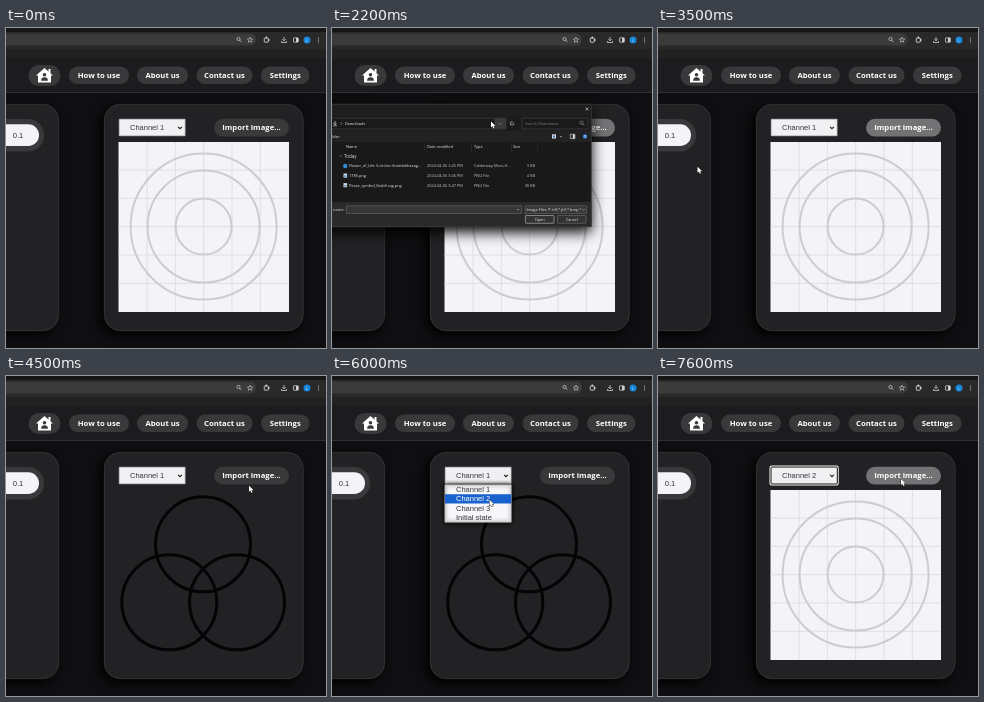
These frames come from a looping animation (320 px wide and 320 px high, 8000 ms). An HTML page with a canvas:

```html
<!DOCTYPE html>
<html lang="en">
<head>
<meta charset="utf-8">
<title>Import image</title>
<style>
html, body { margin: 0; width: 100%; height: 100%; overflow: hidden; background: #0f0e11; }
canvas { display: block; width: 320px; height: 320px; }
</style>
</head>
<body>
<canvas id="stage"></canvas>
<script>
const LOOP = 8000, STEP = 100;
const canvas = document.getElementById('stage');
const dpr = window.devicePixelRatio || 1;
canvas.width = canvas.height = Math.round(320 * dpr);
const c = canvas.getContext('2d');

const UI = '"Open Sans", "Noto Sans", sans-serif';
const ARIAL = '"Liberation Sans", Arial, sans-serif';
const PILL = '#39383a', PILL_HOVER = '#737274', PAPER = '#f4f3f7';

// Pointer stops: time, x, y
const PATH = [
  [400, 53, 190], [700, 130, 150], [1000, 222, 106], [1200, 234, 103.5],
  [1500, 231.5, 102.5], [1800, 231.5, 102.5], [2000, 208, 98], [2200, 159, 93.5],
  [2500, 58, 128], [2700, 37.5, 138], [2900, 37.5, 138], [3200, 39.5, 138.8],
  [3700, 39.5, 138.8], [4000, 110, 128], [4300, 220, 113], [4600, 254.5, 108.2],
  [4700, 247, 104], [4900, 214, 101], [5100, 176, 99], [5300, 169, 99],
  [5400, 169, 99], [5700, 162, 111], [6000, 157.5, 123.8], [6700, 157.5, 123.8],
  [7000, 183, 117], [7300, 231, 105], [7500, 243.5, 104], [7600, 243, 103]
];

function pointer(t) {
  if (t < PATH[0][0]) return null;
  for (let i = 1; i < PATH.length; i++) {
    const [t0, x0, y0] = PATH[i - 1], [t1, x1, y1] = PATH[i];
    if (t <= t1) {
      const k = (t - t0) / (t1 - t0);
      return { x: x0 + (x1 - x0) * k, y: y0 + (y1 - y0) * k };
    }
  }
  const last = PATH[PATH.length - 1];
  return { x: last[1], y: last[2] };
}

function rect(x, y, w, h, fill) {
  c.fillStyle = fill;
  c.fillRect(x, y, w, h);
}

function box(x, y, w, h, r, fill, stroke, lw = 0.6) {
  c.beginPath();
  c.roundRect(x, y, w, h, r);
  if (fill) { c.fillStyle = fill; c.fill(); }
  if (stroke) { c.strokeStyle = stroke; c.lineWidth = lw; c.stroke(); }
}

function line(color, lw, ...p) {
  c.beginPath();
  c.moveTo(p[0], p[1]);
  for (let i = 2; i < p.length; i += 2) c.lineTo(p[i], p[i + 1]);
  c.strokeStyle = color;
  c.lineWidth = lw;
  c.stroke();
}

function ring(x, y, r, color, lw) {
  c.beginPath();
  c.arc(x, y, r, 0, Math.PI * 2);
  c.strokeStyle = color;
  c.lineWidth = lw;
  c.stroke();
}

function dot(x, y, r, fill) {
  c.beginPath();
  c.arc(x, y, r, 0, Math.PI * 2);
  c.fillStyle = fill;
  c.fill();
}

function poly(fill, ...p) {
  c.beginPath();
  for (let i = 0; i < p.length; i += 2) c.lineTo(p[i], p[i + 1]);
  c.closePath();
  c.fillStyle = fill;
  c.fill();
}

function text(s, x, y, font, color, align = 'left') {
  c.font = font;
  c.fillStyle = color;
  c.textAlign = align;
  c.textBaseline = 'alphabetic';
  c.fillText(s, x, y);
}

function button(label, x, y, w, h, fill = PILL) {
  box(x, y, w, h, h / 2, fill);
  text(label, x + w / 2, y + h / 2 + 2.8, 'bold 7.7px ' + UI, '#fff', 'center');
}

function chevron(x, y, s, color, lw) {
  line(color, lw, x - s, y - s / 2, x, y + s / 2, x + s, y - s / 2);
}

function lens(x, y, color) {
  ring(x - 0.5, y - 0.5, 1.6, color, 0.7);
  line(color, 0.8, x + 0.7, y + 0.7, x + 2.4, y + 2.4);
}

function browserBar() {
  const ink = '#d2d2d4';
  rect(0, 0, 320, 4, '#161617');
  rect(0, 4, 320, 17, '#29292a');
  box(-20, 5.5, 270, 12, 6, '#3b3b3c');
  rect(0, 21, 320, 9, '#222223');
  lens(233, 11.5, ink);
  c.beginPath();
  for (let i = 0; i < 10; i++) {
    const r = i % 2 ? 1.2 : 2.8, a = i * Math.PI / 5 - Math.PI / 2;
    c.lineTo(244 + r * Math.cos(a), 12 + r * Math.sin(a));
  }
  c.closePath();
  c.strokeStyle = ink;
  c.lineWidth = 0.6;
  c.stroke();
  box(258.3, 10, 4, 4.2, 0.5, null, ink, 0.9);
  dot(260.3, 9.5, 0.9, ink);
  dot(262.8, 12, 0.9, ink);
  line(ink, 0.8, 278, 9, 278, 12.5);
  chevron(278, 12, 1.7, ink, 0.8);
  line(ink, 0.8, 275.5, 13, 275.5, 14.5, 280.5, 14.5, 280.5, 13);
  box(287.5, 9.8, 4.8, 4.4, 0.5, null, ink, 0.8);
  rect(290, 10, 2.2, 4, ink);
  dot(301, 12, 3.5, '#1687d9');
  text('L', 301, 13.5, '4px ' + UI, '#d8efff', 'center');
  for (let i = -1; i < 2; i++) dot(312.5, 12 + i * 2, 0.6, ink);
}

function nav() {
  rect(0, 30, 320, 34, '#1c1b1d');
  rect(0, 64, 320, 0.8, '#39383a');
  box(22.5, 37, 32, 21, 10.5, PILL);
  poly('#fff', 38.5, 40, 47, 47.5, 45, 47.5, 45, 54.5, 32, 54.5, 32, 47.5, 30, 47.5);
  rect(42.5, 41, 2, 4, '#fff');
  dot(38.5, 46.7, 1.8, PILL);
  c.beginPath();
  c.arc(38.5, 52.7, 3.4, Math.PI, 0);
  c.fillStyle = PILL;
  c.fill();
  button('How to use', 63, 38.5, 60, 17.5);
  button('About us', 131, 38.5, 51, 17.5);
  button('Contact us', 190.5, 38.5, 56, 17.5);
  button('Settings', 255, 38.5, 48.5, 17.5);
}

function card(x, w) {
  c.save();
  c.shadowColor = '#000';
  c.shadowBlur = 12 * dpr;
  c.shadowOffsetX = -4 * dpr;
  c.shadowOffsetY = 4 * dpr;
  box(x, 76, w, 227, 16, '#222123');
  c.restore();
  box(x + 0.3, 76.3, w - 0.6, 226.4, 16, null, '#39383b', 0.7);
}

function target() {
  rect(112.5, 114, 170.5, 170, PAPER);
  for (let i = 1; i < 6; i++) {
    const d = i * 28.3;
    line('#dedde2', 0.9, 112.8 + d, 114, 112.8 + d, 284);
    line('#dedde2', 0.9, 112.5, 113.8 + d, 283, 113.8 + d);
  }
  for (const r of [28, 56, 73]) ring(197.6, 198.6, r, '#cdccd1', 2);
}

function trio() {
  for (const [x, y] of [[197, 168.3], [163.3, 226.3], [231, 226.3]]) ring(x, y, 47.5, '#040305', 3);
}

function select(label, focus) {
  if (focus) box(112.3, 90.3, 67.6, 18.4, 1.5, null, '#fff', 1.6);
  box(113, 91, 66.3, 17, 0.5, '#f0eff2', focus ? '#111' : '#777679', focus ? 1 : 0.7);
  text(label, 124, 102.4, '7.5px ' + ARIAL, '#3a393c');
  chevron(174, 99.8, 1.9, '#222', 1.1);
}

function menu(active) {
  c.save();
  c.shadowColor = '#000';
  c.shadowBlur = 4 * dpr;
  box(112.7, 108.6, 66.8, 37.8, 1, '#f7f6f9', '#777679', 0.7);
  c.restore();
  ['Channel 1', 'Channel 2', 'Channel 3', 'Initial state'].forEach((s, i) => {
    const y = 109 + i * 9.25;
    if (i === active) rect(113, y, 66.2, 9.25, '#1762cc');
    text(s, 124, y + 7.2, '7.5px ' + ARIAL, i === active ? '#fff' : '#3a393c');
  });
}

function dialog(t, alpha) {
  const small = '3.9px ' + UI, white = '#e8e8e8', grey = '#a0a0a2';
  const put = (s, x, y, color = white) => text(s, x, y + 1.3, small, color);
  c.save();
  c.globalAlpha = alpha;
  c.save();
  c.shadowColor = '#000';
  c.shadowBlur = 14 * dpr;
  c.shadowOffsetY = 5 * dpr;
  box(-20, 76, 279.5, 123, 2, '#1b1b1c');
  c.restore();
  rect(0, 76.5, 259, 11.5, '#1f1f20');
  line(white, 0.6, 253.5, 79.5, 256.5, 82.5);
  line(white, 0.6, 256.5, 79.5, 253.5, 82.5);

  box(-10, 90, 184, 11, 0, '#1a1a1b', '#49494b');
  line(white, 0.7, 3, 93, 3, 96.5);
  chevron(3, 96, 1.5, white, 0.7);
  line(white, 0.6, 1, 97.8, 5, 97.8);
  line(grey, 0.6, 8.7, 94, 9.9, 95.5, 8.7, 97);
  put('Downloads', 13, 95.4);
  if (t >= 2100 && t < 2400) rect(162.5, 90.3, 11.2, 10.4, '#3b3b3d');
  chevron(168, 95.7, 1.2, grey, 0.6);
  ring(180, 95.5, 1.7, white, 0.6);
  rect(180.6, 93, 1.3, 1.7, '#1b1b1c');
  box(190, 90, 66, 11, 0, '#1a1a1b', '#49494b');
  put('Search Downloads', 193, 95.4, '#7c7c7e');
  lens(250, 95.2, '#8c8c8e');

  rect(0, 102.5, 259, 11.5, '#222223');
  put('older', -2, 108.5);
  box(220, 106.3, 4, 4.2, 0, '#d8d8da');
  rect(221, 107.5, 2, 2, '#2b7bd0');
  chevron(229, 108.6, 1, white, 0.6);
  box(238.3, 106.3, 4.6, 4.3, 0, null, white, 0.6);
  rect(240.8, 106.5, 1.8, 4, white);
  dot(253, 108.5, 2.2, '#3382cf');
  text('?', 253, 109.8, 'bold 3.5px ' + UI, '#fff', 'center');

  rect(0, 114, 259, 60, '#19191a');
  [['Name', 14], ['Date modified', 95], ['Type', 142], ['Size', 181]].forEach(([s, x]) => put(s, x, 118.2));
  for (const x of [92.5, 139.5, 179, 205]) rect(x, 114.5, 0.5, 8, '#3a3a3c');
  chevron(8.8, 128, 1.2, grey, 0.6);
  text('Today', 12, 129.7, '4.5px ' + UI, white);
  if (t >= 2500) rect(5, 133.3, 200, 9.4, t >= 2700 ? '#555557' : '#3c3c3e');
  [
    ['Flower_of_Life 3-circles rhombitihexag...', '3:45', 'Calderway Moss H...', '3 KB'],
    ['1786.png', '3:46', 'PNG File', '4 KB'],
    ['Peace_symbol_(bold).svg.png', '3:47', 'PNG File', '30 KB']
  ].forEach(([name, time, type, size], i) => {
    const y = 138 + i * 9.6;
    if (i) {
      box(11.5, y - 2, 3.6, 4, 0, '#e3e3e5');
      rect(12.2, y - 0.3, 2.2, 1.5, '#3784c9');
    } else dot(13.2, y, 2.2, '#2b8fd2');
    put(name, 17, y);
    put('2024-04-06 ' + time + ' PM', 95, y, '#c9c9cb');
    put(type, 142, y, '#c9c9cb');
    text(size, 203, y + 1.3, small, '#c9c9cb', 'right');
  });

  rect(0, 174, 259.5, 25, '#2a2a2b');
  text('e name:', 12.5, 182.8, small, white, 'right');
  box(14.5, 177.8, 175, 7.7, 0, '#363637', '#69696b');
  if (t >= 2700) put('Flower_of_Life 3-circles rhombitihexagonal.svg', 16, 181.7);
  chevron(186, 181.7, 1, white, 0.6);
  box(193, 177.8, 61.5, 7.7, 0, '#363637', '#69696b');
  put('Image Files (*.tiff;*.jfif;*.bmp;*...', 194.5, 181.7);
  rect(249, 178.3, 5, 6.8, '#363637');
  chevron(251.5, 181.7, 1, white, 0.6);
  box(193.5, 187.5, 28.5, 7.8, 0.5, '#333334', '#98989a', 0.8);
  box(225.5, 187.5, 28.5, 7.8, 0.5, '#333334', '#6f6f71');
  text('Open', 207.7, 192.8, small, white, 'center');
  text('Cancel', 239.7, 192.8, small, white, 'center');
  box(-20, 76.2, 279.3, 122.6, 2, null, '#49494b', 0.6);
  c.restore();
}

function arrow({ x, y }) {
  c.save();
  c.translate(x, y);
  c.beginPath();
  [[0, 0], [0, 6], [1.4, 4.8], [2.4, 7], [3.5, 6.5], [2.5, 4.4], [4.4, 4.3]].forEach(p => c.lineTo(...p));
  c.closePath();
  c.lineJoin = 'round';
  c.strokeStyle = '#222';
  c.lineWidth = 0.9;
  c.stroke();
  c.fillStyle = '#fff';
  c.fill();
  c.restore();
}

function draw(t) {
  const p = pointer(t);
  const inside = p && p.x > 208 && p.x < 283 && p.y > 91 && p.y < 108;
  const hover = inside || (t >= 1500 && t < 3800);
  const chosen = t >= 6700;

  c.setTransform(canvas.width / 320, 0, 0, canvas.height / 320, 0, 0);
  rect(0, 0, 320, 320, '#0f0e11');
  card(-60, 113);
  card(98, 199.5);
  browserBar();
  nav();

  box(-40, 91, 78, 32.5, 16, PILL);
  box(-30, 96.3, 63, 21.7, 10.8, PAPER);
  text('0.1', 12, 110, '7.6px ' + ARIAL, '#333', 'center');

  if (t >= 3600 && !chosen) trio();
  else target();
  button('Import image...', 208, 90.8, 75, 17.7, hover ? PILL_HOVER : PILL);
  select(chosen ? 'Channel 2' : 'Channel 1', chosen);
  if (t >= 5300 && t < 6700) menu(p.y < 118.25 ? 0 : 1);
  if (t >= 1600 && t < 3500) dialog(t, t < 1700 || t >= 3400 ? 0.6 : 1);
  if (p) arrow(p);
}

const start = performance.now();
function tick() {
  const t = (performance.now() - start) % LOOP;
  draw(Math.floor(t / STEP) * STEP);
  requestAnimationFrame(tick);
}
tick();
</script>
</body>
</html>
```
